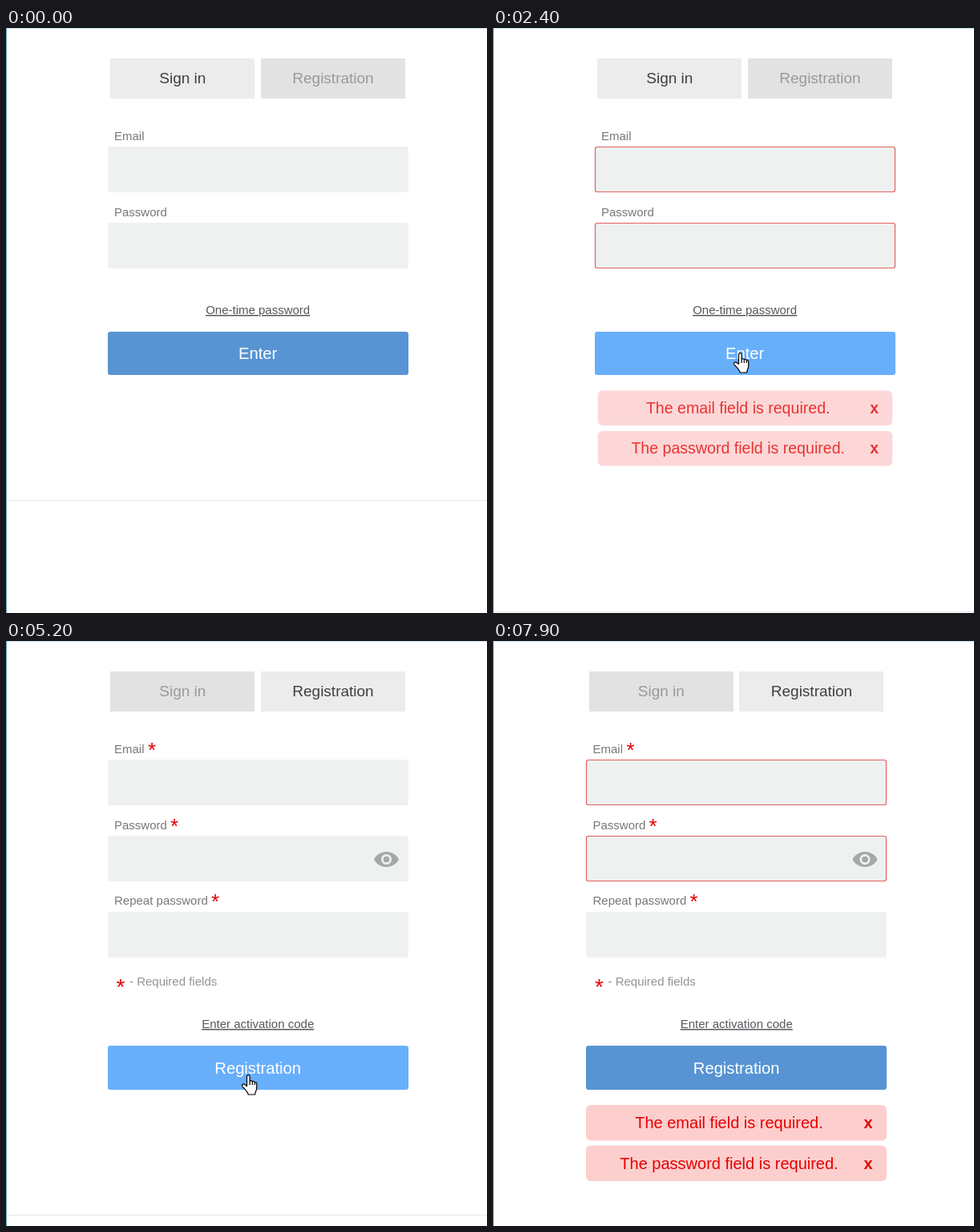
Recreate the animation shown at these times as an HTML page. Size 600 by 730 pixels, loop 8000 ms.

```html
<!DOCTYPE html>
<html lang="en">
<head>
<meta charset="utf-8">
<title>Sign in form</title>
<style>
  html, body { margin: 0; width: 100%; height: 100%; overflow: hidden; background: #fff; }
  svg { display: block; width: 600px; height: 730px; font-family: "Liberation Sans", Arial, sans-serif; }
  .label { font-size: 15px; fill: #75787a; }
  .note { font-size: 15px; fill: #939393; }
  .link { font-size: 15px; fill: #54585c; text-decoration: underline; }
  .tab { font-size: 19px; }
  .enter { font-size: 20.2px; fill: #fff; }
  .alert { font-size: 20px; fill: #e60000; }
  .star { font-size: 26px; fill: #e60000; }
  .mid { text-anchor: middle; }
</style>
</head>
<body>
<svg id="stage" viewBox="0 0 600 730"></svg>
<script>
const LOOP = 8000;
const stage = document.getElementById('stage');

function add(parent, tag, attrs, text) {
  const el = document.createElementNS('http://www.w3.org/2000/svg', tag);
  for (const key in attrs) el.setAttribute(key, attrs[key]);
  if (text) el.textContent = text;
  parent.appendChild(el);
  return el;
}
const group = parent => add(parent, 'g', {});
const rect = (g, x, y, width, height, fill, rx = 0) => add(g, 'rect', { x, y, width, height, fill, rx });
const label = (g, x, y, cls, text, extra) => add(g, 'text', { x, y, class: cls, ...extra }, text);
const show = (el, on) => el.setAttribute('visibility', on ? 'inherit' : 'hidden');

function drawEye(g, x, y) {
  const eye = add(g, 'g', { transform: `translate(${x} ${y})` });
  add(eye, 'path', { d: 'M-15.5 0C-12.5-6-6.5-9.5 0-9.5S12.5-6 15.5 0C12.5 6 6.5 9.5 0 9.5S-12.5 6-15.5 0Z', fill: '#a6a8a8' });
  add(eye, 'circle', { r: 5.2, fill: 'none', stroke: '#eff1f1', 'stroke-width': 2.7 });
}

function drawAlert(g, left, top, text) {
  const bar = group(g);
  rect(bar, left, top, 375, 44.5, '#fdcece', 6);
  label(bar, left + 178.5, top + 29, 'alert mid', text);
  label(bar, left + 352, top + 29, 'alert mid', 'x', { 'font-weight': 'bold' });
  return { bar, cx: left + 187.5, cy: top + 22.2 };
}

// Builds one state of the form; dx is the sideways shift of the column.
function buildForm(joining, dx) {
  const root = group(stage);
  const left = 127 + Math.floor(dx);
  const tabs = [
    ['Sign in', 130 + Math.ceil(dx), 220.3, !joining],
    ['Registration', 318 + Math.floor(dx), 408, joining]
  ];
  for (const [text, x, cx, active] of tabs) {
    rect(root, x, 38, 180, 50, active ? '#ececec' : '#e2e2e2');
    label(root, cx + dx, 69, 'tab mid', text, { fill: active ? '#3f3f3f' : '#999' });
  }

  const fields = [['Email', 148, 140, 182], ['Password', 243, 235, 210]];
  if (joining) fields.push(['Repeat password', 338, 329, 261]);
  for (const [text, y, base, starX] of fields) {
    label(root, 135 + dx, base, 'label', text);
    if (joining) label(root, starX + dx, base + 5, 'star mid', '*');
    rect(root, left, y, 375, 57, '#eff1f1', 3);
  }

  const top = joining ? 505 : 379;
  const height = joining ? 55 : 54;
  const cx = 314.2 + dx;
  if (joining) {
    drawEye(root, 474.5 + dx, 272.5);
    label(root, 143 + dx, 440.5, 'star mid', '*', { style: 'font-size:28px' });
    label(root, 154 + dx, 430, 'note', '- Required fields');
  }
  label(root, cx, top - 22, 'link mid', joining ? 'Enter activation code' : 'One-time password');
  const button = rect(root, left, top, 375, height, '#5894d3', 3);
  label(root, cx, top + (joining ? 35 : 34), 'enter mid', joining ? 'Registration' : 'Enter');

  const errors = group(root);
  for (const y of [148, 243])
    add(errors, 'rect', { x: left + .5, y: y + .5, width: 374, height: 56, rx: 2.5, fill: 'none', stroke: '#e0625f', 'stroke-width': 1.2 });
  const alerts = ['email', 'password'].map((name, i) =>
    drawAlert(errors, left, top + height + 19 + i * 50.5, `The ${name} field is required.`));
  return { root, button, errors, alerts };
}

const forms = [buildForm(false, 0), buildForm(true, 0), buildForm(true, -10.5)];

rect(stage, 0, 0, 600, 1, '#c6dfeb');
rect(stage, 0, 0, 1, 730, '#5fa6c9');
const footer = rect(stage, 2, 589, 598, 1, '#e5e8ea');

const cursor = group(stage);
const ink = { fill: '#fff', stroke: '#000', 'stroke-width': 1.2, 'stroke-linejoin': 'round' };
const arrow = add(cursor, 'path', { ...ink, d: 'M0 0V16.5L4 13l2.6 6 2.6-1.1L6.7 12H12Z' });
const hand = add(cursor, 'path', {
  ...ink,
  d: 'M-1.5 13.5V1.5a1.8 1.8 0 0 1 3.6 0V7.5a1.7 1.7 0 0 1 3.2.6a1.7 1.7 0 0 1 3 .8a1.5 1.5 0 0 1 2.4 1.2V16' +
     'C10.7 19 8.7 20 8.7 24H.2C0 21-5 17-7.3 13.5C-8.3 11.5-6 10-4 11.5ZM2.1 7.5V12M5.3 8V12M8.3 9V12'
});

// [time, x, y]
const path = [
  [700, 436, 300], [1100, 308, 406], [2900, 308, 406], [3500, 371, 63],
  [4550, 371, 63], [5000, 302, 542], [7400, 302, 542], [7700, 503, 322]
];
// [time, amount of button highlight]
const hover = [
  [1090, 0], [1390, 1], [2950, 1], [3250, 0], [4870, 0], [5150, 1], [7450, 1], [7750, 0]
];
// [time, form, footer line, when its alerts start]
const states = [
  [0, 0, 589, Infinity], [2200, 0, 728, 2200], [3900, 1, 716, Infinity], [6200, 2, 740, 6200]
];

const smooth = u => u * u * (3 - 2 * u);
const linear = u => u;
function sample(table, t, ease, col) {
  const next = table.findIndex(row => row[0] > t);
  if (next === 0) return table[0][col];
  if (next < 0) return table[table.length - 1][col];
  const a = table[next - 1], b = table[next];
  return a[col] + (b[col] - a[col]) * ease((t - a[0]) / (b[0] - a[0]));
}
function mix(from, to, u) {
  return `rgb(${from.map((v, i) => Math.round(v + (to[i] - v) * u))})`;
}

function draw(t) {
  const [, index, lineY, start] = states.filter(s => s[0] <= t).pop();
  forms.forEach((f, i) => show(f.root, i === index));
  const form = forms[index];
  footer.setAttribute('y', lineY);

  const glow = sample(hover, t, linear, 1);
  form.button.setAttribute('fill', mix([88, 148, 211], [104, 175, 251], glow));

  show(form.errors, t >= start);
  if (t >= start) {
    const p = 1 - Math.pow(1 - Math.min(1, (t - start) / 400), 2.3);
    for (const { bar, cx, cy } of form.alerts) {
      bar.setAttribute('opacity', p);
      bar.setAttribute('transform', `translate(${cx} ${cy}) scale(${.9 + .1 * p}) translate(${-cx} ${-cy})`);
    }
  }

  const x = sample(path, t, smooth, 1), y = sample(path, t, smooth, 2);
  const top = index ? 505 : 379;
  const onButton = x < 502 && y >= top && y < top + 55;
  const over = onButton || y < 88;
  show(cursor, t >= 700 && t < 7700);
  show(hand, over);
  show(arrow, !over);
  cursor.setAttribute('transform', `translate(${x} ${y})`);
}

const begin = performance.now();
function tick() {
  draw((performance.now() - begin) % LOOP);
  requestAnimationFrame(tick);
}
tick();
</script>
</body>
</html>
```
